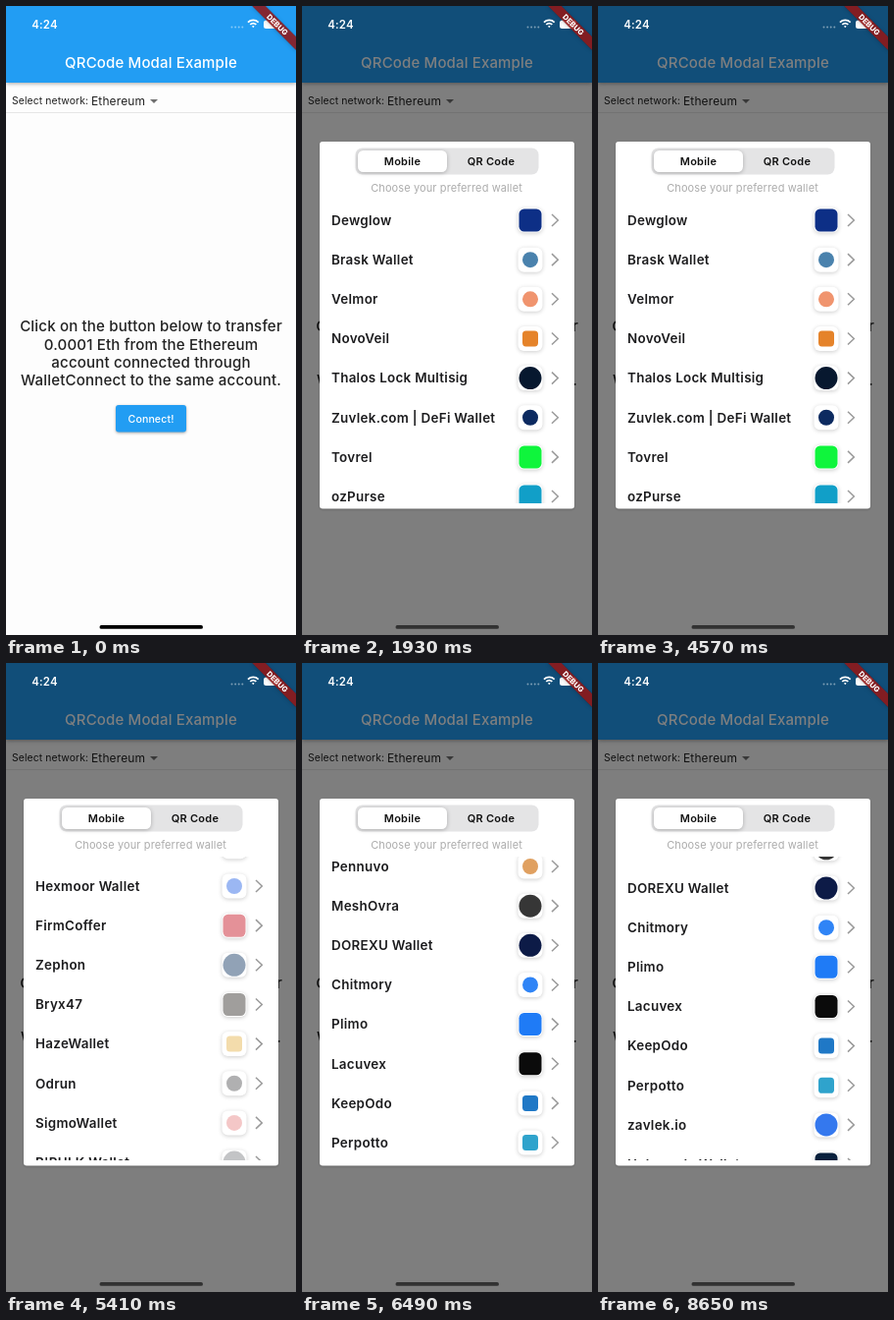
Write an HTML page with a canvas that moves like this. It is 296 px wide and 640 px high and loops after 8740 ms.

```html
<!DOCTYPE html>
<html lang="en">
<head>
<meta charset="utf-8">
<title>QRCode Modal Example</title>
<style>
  html, body { margin: 0; width: 100%; height: 100%; overflow: hidden; background: #fdfdfd; }
  canvas { display: block; width: 296px; height: 640px; }
</style>
</head>
<body>
<canvas></canvas>
<script>
const W = 296, H = 640, LOOP = 8740, ROW = 40.15;
const canvas = document.querySelector('canvas');
const dpr = window.devicePixelRatio || 1;
canvas.width = W * dpr;
canvas.height = H * dpr;
const c = canvas.getContext('2d');
c.scale(dpr, dpr);

// name, icon colour, icon shape: S/C = large square/circle, s/c = small ones
const rows = `Dewglow,#0d2f86,S
Brask Wallet,#4a82ad,c
Velmor,#f0946e,c
NovoVeil,#e5832a,s
Thalos Lock Multisig,#07182f,C
Zuvlek.com | DeFi Wallet,#0c2a60,c
Tovrel,#0ff53c,S
ozPurse,#119fc8,S
Wexlo,#3a6fd0,C
BitDrusk,#2b7df0,S
KalmWallet,#222222,s
PayNurv,#1a3b8b,S
Fendle Live,#333a45,s
Quolth,#6b7fd0,c
Ambrevo,#e05a4a,c
Nelka,#23b07a,C
7ombo Wallet,#d04048,s
Hurzo Wallet,#2a6ad8,S
Orvidu,#35507a,c
UMKEL,#3a80e0,s
Hexmoor Wallet,#3f74e8,c
FirmCoffer,#c8202f,S
Zephon,#163a64,C
Bryx47,#2b2722,S
HazeWallet,#e3ad3c,s
Odrun,#3a3a3c,c
SigmoWallet,#e36a6a,c
B'RULK Wallet,#55585e,C
Ozmelk,#2d6fd6,C
Varn,#18a58a,s
Pennuvo,#e0a060,c
MeshOvra,#363636,C
DOREXU Wallet,#0d1b47,C
Chitmory,#2f84f6,c
Plimo,#1f7bf6,S
Lacuvex,#0b0b0b,S
KeepOdo,#1f78c6,s
Perpotto,#2fa3cc,s
zavlek.io,#3478ee,C
Unbounda Wallet,#08203c,S`.split('\n').map(line => line.split(','));

// [first, last, count] of the picture changes
const changes = [[0, 0, 1], [700, 1480, 8], [1590, 1590, 1], [1930, 1930, 1], [2440, 2970, 6],
  [3910, 4570, 7], [4970, 5840, 9], [5950, 6820, 9], [6920, 7150, 3], [7330, 7330, 1],
  [7470, 8330, 9], [8450, 8650, 3]];
const ticks = changes.flatMap(([a, b, n]) =>
  Array.from({ length: n }, (_, i) => Math.round((a + (n > 1 ? (b - a) * i / (n - 1) : 0)) / 10) * 10));

// fling: distance still to travel, decaying exponentially between points
const END = 1275;
const fling = [[4920, END], [5410, 481], [6490, 59.5], [7470, 7.7], [8650, 1.2]];

const clamp = v => Math.max(0, Math.min(1, v));
const ramp = (t, start, length) => clamp((t - start) / length);
const ease = v => 1 - (1 - v) ** 3;
const dialogAlpha = t => ramp(t, 950, 250);

function scrollAt(t) {
  if (t <= fling[0][0]) return 0;
  let i = 0;
  while (i < fling.length - 2 && t >= fling[i + 1][0]) i++;
  const [t0, r0] = fling[i], [t1, r1] = fling[i + 1];
  return END - r0 * (r1 / r0) ** ((t - t0) / (t1 - t0));
}

function text(str, x, midY, size, weight, color, align = 'left') {
  c.font = `${weight} ${size}px Inter, sans-serif`;
  c.letterSpacing = `${size * (weight === 600 ? 0.022 : 0.01)}px`;
  c.textAlign = align;
  c.fillStyle = color;
  c.fillText(str, x, midY + size * 0.364);
}

function box(x, y, w, h, r, color, blur = 0, shadow = 'rgba(0,0,0,.35)') {
  c.save();
  if (blur) {
    c.shadowColor = shadow;
    c.shadowBlur = blur * dpr;
    c.shadowOffsetY = dpr;
  }
  c.fillStyle = color;
  c.beginPath();
  c.roundRect(x, y, w, h, r);
  c.fill();
  c.restore();
}

function disc(x, y, r, color) {
  c.fillStyle = color;
  c.beginPath();
  c.arc(x, y, r, 0, 7);
  c.fill();
}

function page(t) {
  box(0, 0, W, H, 0, '#fdfdfd');
  box(0, 0, W, 78, 0, '#229df3', 4);
  text('QRCode Modal Example', 148, 57.5, 15, 500, '#fff', 'center');
  text('Select network:', 6, 96.5, 10.4, 400, '#222');
  text('Ethereum', 87, 96.5, 12, 400, '#222');
  c.fillStyle = '#707070';
  c.beginPath();
  c.moveTo(147, 95);
  c.lineTo(155, 95);
  c.lineTo(151, 99);
  c.fill();
  box(0, 108, W, 1, 0, '#e6e6e6');

  ['Click on the button below to transfer', '0.0001 Eth from the Ethereum',
    'account connected through', 'WalletConnect to the same account.']
    .forEach((line, i) => text(line, 148, 326 + i * 18.2, 15.1, 500, '#222', 'center'));

  box(112, 406, 72, 27.5, 3, '#229df3', 3);
  const press = ramp(t, 650, 350);
  if (press > 0 && t < 1200) {
    c.save();
    c.beginPath();
    c.roundRect(112, 406, 72, 27.5, 3);
    c.clip();
    disc(148, 420, 45 * press, `rgba(255,255,255,${0.25 * (1 - ramp(t, 950, 250))})`);
    c.restore();
  }
  text('Connect!', 148, 420, 10.6, 500, '#fff', 'center');
}

function iconAlpha(i, t) {
  if (i > 7) return ramp(t, 4910 + 12 * i, 500);
  return t < 3910 ? ramp(t, 1150, 440) : ramp(t, 3880, 600);
}

function drawRow(i, y, t, alpha) {
  const [name, color, shape] = rows[i];
  text(name, 30, y, 13.4, 600, '#1c1c1e');
  box(220.5, y - 12.5, 25, 25, 6, '#fff', 4, 'rgba(0,0,0,.2)');
  c.globalAlpha = alpha * iconAlpha(i, t);
  const r = shape < 'a' ? 11.5 : 8;
  if (shape.toLowerCase() === 'c') disc(233, y, r, color);
  else box(233 - r, y - r, 2 * r, 2 * r, r * 0.45, color);
  c.globalAlpha = alpha;
  c.strokeStyle = '#9a9a9a';
  c.lineWidth = 1.5;
  c.beginPath();
  c.moveTo(255, y - 6);
  c.lineTo(261.3, y);
  c.lineTo(255, y + 6);
  c.stroke();
}

function modal(t) {
  const shown = dialogAlpha(t);
  if (!shown) return;
  c.save();
  c.globalAlpha = shown;
  box(0, 0, W, H, 0, 'rgba(0,0,0,.5)');
  box(18, 138, 260, 373.5, 3, '#fff', 2, 'rgba(0,0,0,.2)');

  const tab = ease(ramp(t, 2400, 500)) - ease(ramp(t, 3870, 500));
  box(54.5, 144.5, 187, 27, 7, '#e4e4e5');
  box(57 + 91.5 * tab, 147, 91, 22, 5.5, '#fff', 4, 'rgba(0,0,0,.25)');
  text('Mobile', 102.5, 158, 11, 600, '#111', 'center');
  text('QR Code', 193, 158, 11, 600, '#111', 'center');

  const list = shown * clamp(1 - ramp(t, 2400, 250) + ramp(t, 3870, 250));
  c.globalAlpha = list;
  text('Choose your preferred wallet', 147.5, 184.5, 11, 400, '#acacac', 'center');
  c.beginPath();
  c.rect(18, 197, 260, 309);
  c.clip();
  const top = 218 - scrollAt(t);
  rows.forEach((_, i) => {
    const y = top + i * ROW;
    if (y > 175 && y < 530) drawRow(i, y, t, list);
  });
  c.restore();
}

function statusBar(t) {
  text('4:24', 39.5, 18.8, 11.4, 600, '#fff', 'center');
  for (let i = 0; i < 4; i++) disc(230.5 + i * 3.6, 21.5, 1, 'rgba(255,255,255,.45)');
  c.strokeStyle = '#fff';
  c.lineWidth = 1.7;
  for (const r of [1, 4.3, 7.6]) {
    c.beginPath();
    c.arc(252.3, 22, r, -Math.PI * 0.75, -Math.PI * 0.25);
    c.stroke();
  }
  box(263, 14.5, 17, 8.5, 2.5, '#fff');

  // translucent ribbon over its own soft shadow
  c.save();
  c.translate(W, 0);
  c.rotate(Math.PI / 4);
  box(-32, 22.1, 64, 9.5, 0, 'rgba(0,0,0,.5)', 4);
  box(-32, 22.1, 64, 9.5, 0, 'rgba(183,28,28,.7)');
  text('DEBUG', 0, 26.9, 7.6, 800, '#fff', 'center');
  c.restore();

  const grey = 50 * dialogAlpha(t);
  box(95.5, 630, 105.5, 3.8, 1.9, `rgb(${grey},${grey},${grey})`);
}

const start = performance.now();
function frame() {
  const time = (performance.now() - start) % LOOP;
  const t = ticks.findLast(tick => tick <= time);
  page(t);
  modal(t);
  statusBar(t);
  requestAnimationFrame(frame);
}
frame();
</script>
</body>
</html>
```
